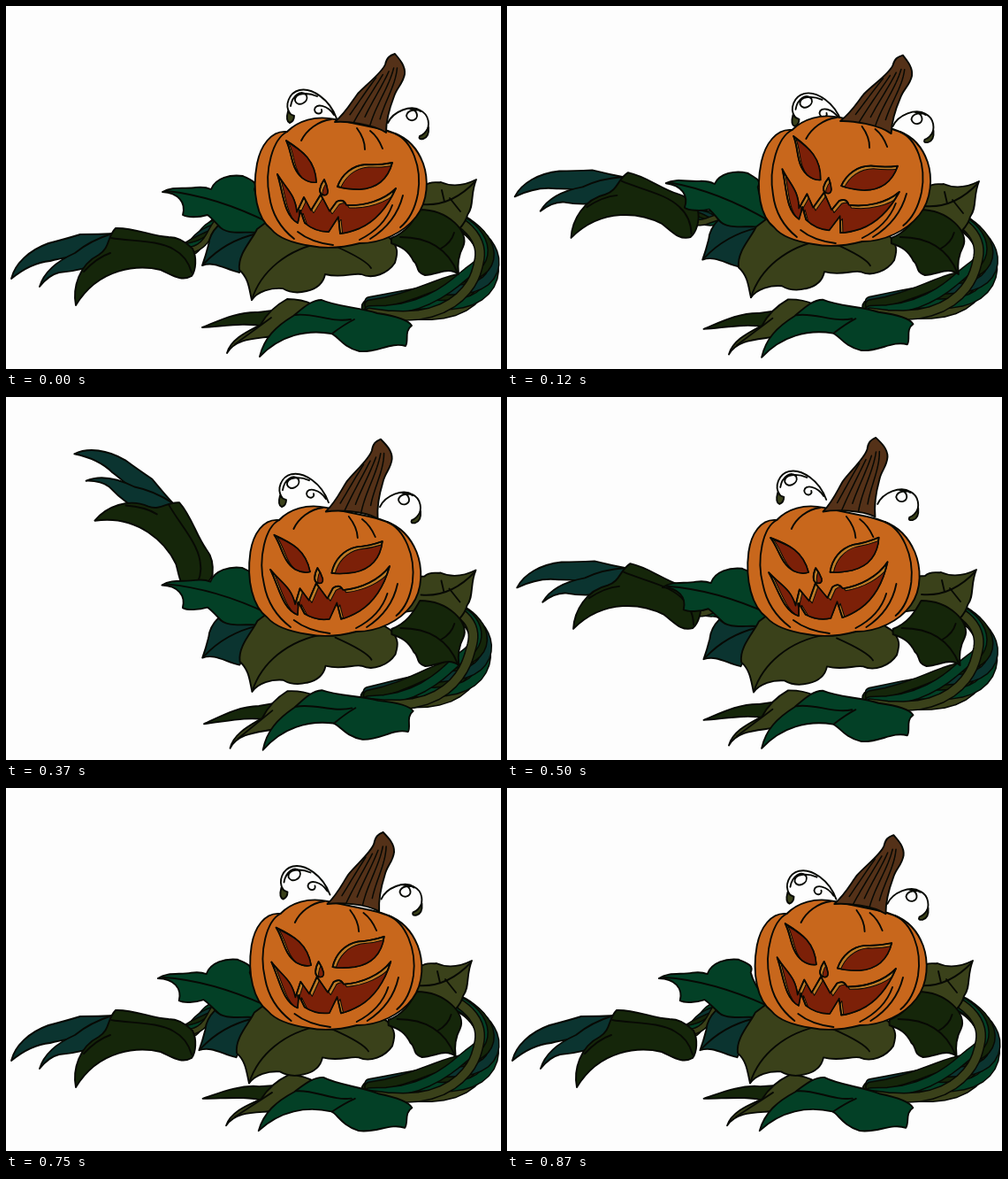
These frames come from a looping animation (560 px wide and 410 px high, 1 s). An HTML page with a canvas:

```html
<!DOCTYPE html>
<html lang="en">
<head>
<meta charset="utf-8">
<title>Pumpkin creature</title>
<style>
html, body { margin: 0; width: 100%; height: 100%; overflow: hidden; background: #fdfdfd }
canvas { display: block }
</style>
</head>
<body>
<canvas id="stage" width="560" height="410"></canvas>
<script>
const ctx = document.getElementById('stage').getContext('2d');
const INK = '#070904', ORANGE = '#c8671c', BROWN = '#543118', RED = '#7c2008', RIM = '#bd7a25',
  OLIVE = '#3a411a', DARK = '#15260a', TEAL = '#0b3430', GREEN = '#034026';

// Shapes are [fill, path]; an empty fill means ink lines only.
const backLeaf = [
  [OLIVE, 'M440 205L474 203C480 197 487 200 492 199Q510 207 532 196C525 213 530 225 522 236C520 246 512 252 510 255C500 242 480 238 440 245Z'],
  ['', 'M470 224C492 226 512 218 531 198M502 217L514 232M496 221L493 208']
];
const rightHand = [
  [DARK, 'M222 363C240 356 262 345 285 346L310 343L292 362C270 357 245 362 222 363Z'],
  [OLIVE, 'M250 392C255 375 275 367 288 360Q298 342 318 331Q335 331 347 337L312 371C290 377 262 372 250 392Z'],
  [GREEN, 'M287 396C292 375 305 362 325 350C335 342 345 332 357 332C375 340 400 340 420 347C440 350 455 354 459 361C450 367 456 378 452 384C435 379 420 392 400 390C380 385 375 372 368 370C340 365 310 372 287 396Z'],
  ['', 'M327 349C348 346 368 358 390 354M369 370Q382 360 394 354M259 382Q278 368 300 352']
];
const leftHand = [
  [TEAL, 'M6 308C10 291 26 276 48 268Q64 264 84 258Q105 258 123 257L104 278C80 283 65 284 50 288Q28 290 6 308Z'],
  [TEAL, 'M38 317C43 300 58 288 78 279Q95 265 120 257L126 268L108 288C92 297 75 300 60 301Q48 304 38 317Z'],
  [DARK, 'M79 338C75 318 83 292 105 281C118 273 114 261 124 251C144 250 165 260 184 261C196 261 204 267 211 274C216 284 215 298 210 305C198 312 187 303 175 298C150 292 105 295 79 338Z'],
  ['', 'M119 262C142 266 172 264 190 275Q205 283 210 301M88 300Q103 284 118 279']
];
const leftLeaf = [
  [GREEN, 'M177 210C188 203 202 207 215 205Q225 204 232 207C237 194 254 190 268 192C278 197 285 199 281 207C284 221 292 230 303 247C295 257 275 264 262 262C245 258 240 245 228 236C218 239 205 239 200 236C204 222 195 211 177 210Z'],
  ['', 'M182 209C220 213 260 226 298 245']
];
const sideLeaf = [
  [TEAL, 'M287 256C270 254 250 260 240 248Q230 258 229 270Q226 282 222 293C236 288 247 297 264 301C270 290 287 270 287 256Z'],
  ['', 'M284 257C258 263 240 274 224 291']
];
const frontLeaf = [
  [OLIVE, 'M284 252C278 265 262 280 264 298C275 308 275 320 278 332C285 322 300 318 313 319Q325 326 340 322Q358 318 361 303C380 308 392 301 402 303C415 309 432 302 440 290C442 282 446 274 434 262L400 240L300 240Z'],
  ['', 'M278 332C288 300 318 274 360 267M372 271C390 279 409 289 413 296']
];
const rightLeaf = [
  [DARK, 'M436 262C455 255 462 240 468 230C500 230 525 255 517 272C511 283 511 295 512 303C500 294 490 303 474 304C462 300 468 293 461 288C455 276 448 272 436 268Z'],
  ['', 'M511 302C500 274 478 261 446 261M492 274Q504 267 507 256']
];
const tendrils = [
  ['', 'M374 127C366 105 346 92 332 95C320 98 315 112 321 121M322 113C324 101 334 94 340 101C343 109 330 115 327 107C326 98 341 97 352 102M371 123C364 112 350 109 349 117C350 124 359 122 357 117'],
  ['', 'M432 132C438 119 458 111 469 118C479 123 480 135 475 143M469 119C465 116 454 117 453 124C455 132 466 130 465 123Q464 117 457 116'],
  [OLIVE, 'M319 119Q316 130 321 132Q326 130 326 124Q322 123 319 119Z'],
  [OLIVE, 'M478 137Q479 148 472 150Q466 151 468 147Q474 145 478 137Z']
];
const body = [
  [ORANGE, 'M372 128C350 123 330 130 318 142C300 140 288 158 284 178C278 210 284 240 300 252C308 262 325 268 345 271C365 275 385 272 400 268C425 268 450 256 464 238C478 220 478 195 472 178C466 162 456 150 440 144Q430 140 420 138Z'],
  ['', 'M318 142C302 150 292 185 298 215C301 236 312 252 326 263M368 128C353 130 340 140 334 152M397 138Q406 150 406 162M412 141Q421 148 426 161M440 144C459 152 471 182 466 212Q461 238 446 250M449 214Q441 245 412 263M437 225Q428 250 400 264M330 255Q345 267 370 270']
];
const holes = [
  'M317 152C336 164 350 175 351 199Q343 200 335 194C322 183 324 166 317 152Z',
  'M375 204C380 190 392 180 407 179Q422 180 437 177C432 195 420 206 400 207Q385 207 375 204Z',
  'M360 196C355 203 353 211 358 213Q364 215 364 209Q363 202 360 196Z',
  'M307 190C317 207 327 212 329 233L337 216L345 231L356 213L366 232L374 221Q382 217 385 225C405 226 427 220 441 206C432 226 420 242 400 251Q388 256 378 257L376 238L365 255Q350 255 338 245L333 231L330 245C314 236 314 212 307 190Z'
];
const stemOutline = 'M372 131C385 120 391 108 398 99C408 88 425 76 429 66C431 58 434 56 440 54C446 61 452 68 451 77C449 88 442 92 439 102C434 115 430 128 430 143C415 133 385 130 372 131Z';

function paint(path, fill, width = 1.9) {
  if (fill) {
    ctx.fillStyle = fill;
    ctx.fill(path);
  }
  ctx.lineWidth = width;
  ctx.strokeStyle = INK;
  ctx.stroke(path);
}

const drawShapes = shapes => shapes.forEach(([fill, d]) => paint(new Path2D(d), fill));

// Runs draw() moved by (dx, dy) and turned about the pivot.
function posed(dx, dy, degrees, [x, y], draw) {
  ctx.save();
  ctx.translate(x + dx, y + dy);
  ctx.rotate(degrees * Math.PI / 180);
  ctx.translate(-x, -y);
  draw();
  ctx.restore();
}

const moved = (dx, dy, shapes) => posed(dx, dy, 0, [0, 0], () => drawShapes(shapes));

const cubic = (t, a, b, c, d) =>
  (1 - t) ** 3 * a + 3 * t * (1 - t) ** 2 * b + 3 * t * t * (1 - t) * c + t ** 3 * d;

// Strands weaving around a Bezier centre line; spread(t) is the braid's half width.
function braid([a, b, c, d], width, spread) {
  const at = (t, k) => cubic(t, a[k], b[k], c[k], d[k]);
  [DARK, OLIVE, GREEN, TEAL, DARK, GREEN, OLIVE].forEach((color, n) => {
    const strand = new Path2D();
    for (let t = 0; t <= 1; t += 0.04) {
      const dx = at(t + 0.01, 0) - at(t, 0), dy = at(t + 0.01, 1) - at(t, 1);
      const offset = n && spread(t) * Math.sin(5 * t + n * Math.PI / 3) / Math.hypot(dx, dy);
      strand.lineTo(at(t, 0) - dy * offset, at(t, 1) + dx * offset);
    }
    const thick = n ? width : width * 1.6;
    paint(strand, '', thick);
    ctx.lineWidth = thick - 3;
    ctx.strokeStyle = color;
    ctx.stroke(strand);
  });
}

// Carved openings: a lit rim, with the dark inside set off from it.
function carve() {
  for (const d of holes) {
    const path = new Path2D(d);
    paint(path, RIM);
    ctx.save();
    ctx.clip(path);
    ctx.translate(3, 3);
    paint(path, RED, 1);
    ctx.restore();
    paint(path, '', 1.5);
  }
}

function drawStem() {
  paint(new Path2D(stemOutline), BROWN);
  for (let k = 1; k < 6; k++) {
    const mix = (a, b) => a + (b - a) * k / 6;
    const streak = new Path2D();
    for (let t = 0.05 + k % 2 * 0.1; t < 0.75 + k * 0.04; t += 0.05)
      streak.lineTo(mix(cubic(t, 372, 392, 404, 431), cubic(t, 430, 431, 452, 445)),
        mix(cubic(t, 131, 110, 88, 62), cubic(t, 143, 110, 90, 62)));
    paint(streak, '', 1.5);
  }
}

function drawArms(lift, flap, grip, raise, drift) {
  const squeeze = Math.max(grip, 0);
  braid([[515, 245], [560 - 12 * squeeze, 270 - 8 * squeeze], [575 - 12 * squeeze, 345 - 8 * squeeze], [390, 340]],
    12, t => 3 + 14 * Math.sin(Math.PI * t * t));
  moved(5 * flap + drift, 5 * flap, backLeaf);
  posed(2 * squeeze, -6 * squeeze, -3 * grip, [455, 368], () => drawShapes(rightHand));

  const wrist = [210, 302], dx = -14 * flap * squeeze, dy = -80 * Math.sqrt(raise);
  const x = 205 + dx, y = 275 + dy * 0.75;
  braid([[x, y], [x + 15, y - 5], [235, 240], [255, 243]], 8, () => 5);
  posed(dx, dy, 46 * raise, wrist, () => drawShapes(leftHand));
}

function drawHead(sway, lift) {
  moved(15 * sway, 13 * sway, tendrils);
  ctx.save();
  ctx.transform(1, 0, -0.07 * sway, 1, 25 * sway, -lift);
  drawShapes(body);
  ctx.restore();
  posed(11 * sway, -lift, 14 * sway, [360, 203], carve);
  posed(17 * sway, -lift / 2, 7 * sway, [372, 131], drawStem);
}

// Start in ms, head sway, head lift, leaf flap, right grip, left arm raise.
const steps = [
  [0, 0, 0, 0, 0, 0],
  [120, 0.3, 2, 0.4, 0.3, 0.3],
  [250, 0.5, 4, 1, 1, 1],
  [370, -0.6, 3, -0.1, 1, 1.1],
  [500, -0.85, 3, -0.2, 0.3, 0.3],
  [620, -1, 0, -0.2, -1, 0],
  [750, -0.5, 0, -0.2, -1, 0],
  [870, -0.1, 0, -0.2, -1, 0]
];

function render() {
  const now = performance.now() % 1000;
  const [, sway, lift, flap, grip, raise] = steps.findLast(([start]) => start <= now);
  const drift = 4 * Math.min(grip, 0);
  ctx.fillStyle = '#fdfdfd';
  ctx.fillRect(0, 0, 560, 410);
  ctx.lineJoin = ctx.lineCap = 'round';

  drawArms(lift, flap, grip, raise, drift);
  posed(drift, -4 * flap, 10 * flap, [296, 245], () => drawShapes(leftLeaf));
  moved(drift - 2 * flap, -16 * flap, sideLeaf);
  moved(drift - 5 * flap, -7 * flap, frontLeaf);
  moved(drift - 3 * flap, 0, rightLeaf);
  drawHead(sway, lift);
  requestAnimationFrame(render);
}
render();
</script>
</body>
</html>
```
